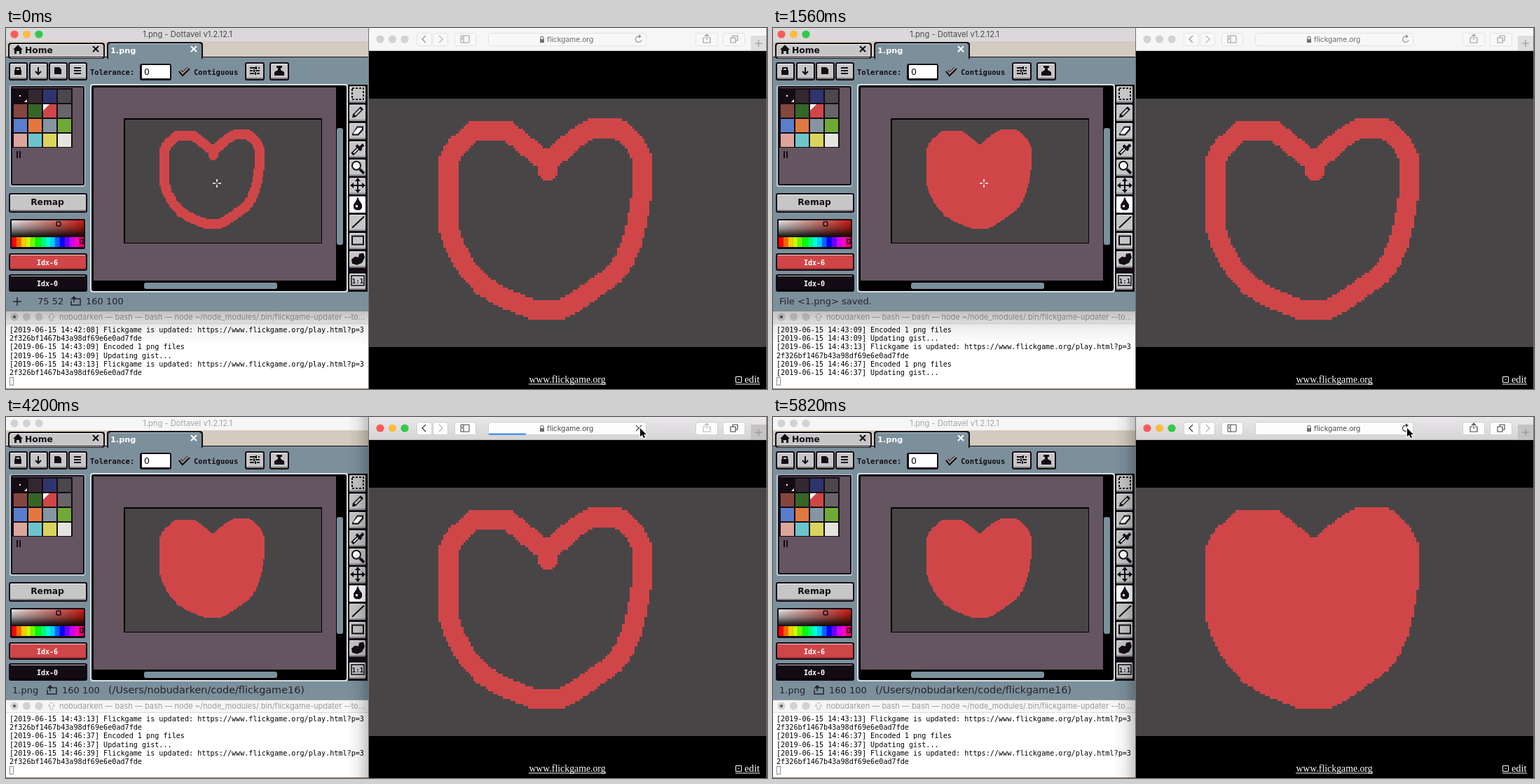
Write an HTML page with a canvas that moves like this. It is 1086x516 px and loops after 5.88 s.

```html
<!DOCTYPE html>
<html>
<head>
<meta charset="utf-8">
<style>
html, body { margin: 0; width: 100%; height: 100%; overflow: hidden; background: #000; }
canvas { display: block; }
</style>
</head>
<body>
<canvas width="1086" height="516"></canvas>
<script>
const LOOP = 5880;
const T = { fill: 360, hold: 600, save: 720, release: 1140, encode: 1260, publish: 2220,
            leave: 2640, overshoot: 3300, arrive: 3600, reload: 3840, blank: 4320, loaded: 4920 };
const UI = 'Inter, sans-serif', PIXEL = '"DejaVu Sans", sans-serif';
const MONO = '"DejaVu Sans Mono", monospace', SERIF = '"Liberation Serif", serif';
const SLATE = '#7c909c', PURPLE = '#655560', DARK = '#484547', RED = '#d04648', GRAY = '#c6c6c6', INK = '#140c14';
const g = document.querySelector('canvas').getContext('2d');

function rect(x, y, w, h, color) { g.fillStyle = color; g.fillRect(x, y, w, h); }

function round(x, y, w, h, r, color, border) {
  g.beginPath();
  g.roundRect(x, y, w, h, r);
  g.fillStyle = color;
  g.fill();
  if (border) { g.strokeStyle = border; g.lineWidth = 1; g.stroke(); }
}

function gradient(x0, y0, x1, y1, ...colors) {
  const grad = g.createLinearGradient(x0, y0, x1, y1);
  colors.forEach((c, i) => grad.addColorStop(i / (colors.length - 1), c));
  return grad;
}

function text(str, x, y, font, color, align = 'left') {
  g.font = font;
  g.fillStyle = color;
  g.textAlign = align;
  g.fillText(str, x, y);
}

// Draws an SVG path at x, y: filled when width is 0, stroked otherwise.
function shape(x, y, d, color, width = 0, dash = []) {
  const path = new Path2D(d);
  g.save();
  g.translate(x, y);
  g.fillStyle = g.strokeStyle = color;
  g.lineWidth = width;
  g.setLineDash(dash);
  width ? g.stroke(path) : g.fill(path);
  g.restore();
}

function dot(x, y, r, color) {
  g.fillStyle = color;
  g.beginPath();
  g.arc(x, y, r, 0, 7);
  g.fill();
}

function lights(x, y, step, colors) { colors.forEach((c, i) => dot(x + i * step, y, 5.6, c)); }
const LIVE = ['#fc5b57', '#fdbc40', '#34c84a'], IDLE = ['#d2d2d2', '#d2d2d2', '#d2d2d2'];

// 160 x 100 pixel sprite: a closed brush stroke, optionally flooded.
const HEART = new Path2D('M72 26V29V26L56 13H42.3L35 19.5 32 25V52L34.4 59.4 39.2 67.9 45.7 75.2 53.6 80 62 83.4 66 84.8H77.6' +
  'L83.8 81.4 91.7 75.8 98.8 70.7 102.7 65.4 105.5 59 107.8 50.4 109.8 39V23.5L107.5 18.5 100.5 12H89.5L82.5 16.3Z');

function makeSprite(flooded) {
  const c = document.createElement('canvas');
  c.width = 160;
  c.height = 100;
  const s = c.getContext('2d');
  s.fillStyle = DARK;
  s.fillRect(0, 0, 160, 100);
  s.fillStyle = RED;
  s.lineWidth = 8;
  s.lineJoin = 'round';
  for (let y = 0; y < 100; y++)
    for (let x = 0; x < 160; x++)
      if (s.isPointInStroke(HEART, x + .5, y + .5) || flooded && s.isPointInPath(HEART, x + .5, y + .5))
        s.fillRect(x, y, 1, 1);
  return c;
}
const outlined = makeSprite(false), flooded = makeSprite(true);

function button(x, y, w, h, face = GRAY, shade = '#7c7c7c') {
  round(x, y, w, h, 3, INK);
  round(x + 2, y + 2, w - 4, h - 4, 1, face);
  rect(x + 3, y + 2, w - 6, 1, 'rgba(255,255,255,.75)');
  rect(x + 2, y + h - 4, w - 4, 2, shade);
}

const TOOLS = [
  [['M-8-8H8V8H-8Z', INK, 2, [3, 2]]],
  [['M-8 8L-7 3 4-8 8-4-3 7Z', INK, 0], ['M-4 4L4-4', GRAY, 3]],
  [['M-8 5L-1-6H8V-1L1 7H-8Z', INK, 0], ['M-6 3L0-4H6V-2L0 5H-6Z', '#fff', 0]],
  [['M-8 8L2-2', INK, 5], ['M-6 6L1-1', '#fff', 2], ['M-2-5L5 2M2 0L8-6', INK, 4]],
  [['M-8-2a6 6 0 1 0 12 0a6 6 0 1 0-12 0', '#fff', 0], ['M-8-2a6 6 0 1 0 12 0a6 6 0 1 0-12 0', INK, 2], ['M3 3L9 9', INK, 4]],
  [['M-9 0H9M0-9V9', INK, 2], ['M0-11L4-6H-4ZM0 11L4 6H-4ZM-11 0L-6-4V4ZM11 0L6-4V4Z', INK, 0]],
  [['M0-10L2-5 6 1V6L3 9H-3L-6 6V1L-2-5Z', INK, 0], ['M-3 2H0V5H-3Z', '#fff', 0]],
  [['M-8 8L9-8', INK, 2]],
  [['M-8-6H8V6H-8Z', INK, 2]],
  [['M2-7L8-8 10-2 6 6-1 9-8 7-9 1-4-3 1-2Z', INK, 0]],
];
const PALETTE = ['#140c14', '#34282f', '#30346d', '#4b484b', '#854640', '#366528', RED, '#676568',
  '#5b7dcb', '#e27841', '#8595a1', '#70aa36', '#dca59b', '#6dc5cc', '#dad45e', '#e2e4de'];
const CHECK = 'M-7-1L-3 4 6-5';
const PAGE = 'M-5-3H6V6H-7V0M-3-6V2M-7-2L-3-6 0-3';

function drawTabs() {
  rect(0, 19, 517, 23, '#d3cbbf');
  round(3, 21, 138, 23, 4, INK);
  round(5, 23, 134, 20, 3, GRAY);
  rect(7, 23, 130, 1, '#fff');
  round(144, 20, 137, 25, 4, INK);
  round(146, 22, 133, 24, 3, SLATE);
  rect(149, 22, 127, 1, '#b9cad2');
  shape(17, 31, 'M0-7L7 0H5V6H2V2H-2V6H-5V0H-7Z', INK);
  text('Home', 27, 36, 'bold 12.3px ' + PIXEL, INK);
  text('1.png', 149, 36, 'bold 11.3px ' + PIXEL, '#fff');
  shape(128, 30, 'M-4-4L4 4M4-4L-4 4', INK, 2);
  shape(268, 30, 'M-4-4L4 4M4-4L-4 4', '#fff', 2);
  rect(0, 41, 145, 1, INK);
  rect(280, 41, 237, 1, INK);
}

function drawOptions(holding) {
  const label = 'bold 10.5px ' + MONO;
  [4, 33, 61, 89].forEach(x => button(x, 49, 27, 26));
  shape(17, 61, 'M-5-1H5V6H-5Z', INK);
  shape(17, 61, 'M-3 0V-4H3V0', INK, 2);
  shape(46, 61, 'M0-5V5M-4 1L0 5 4 1', INK, 2);
  shape(74, 61, 'M-5-5H2L5-2V5H-5Z', INK);
  shape(102, 61, 'M-5-4H5M-5 0H5M-5 4H5', INK, 2);
  const x = holding ? 131 : 255;
  shape(x, 62, CHECK, INK, 5);
  shape(x, 61, CHECK, holding ? '#d8d8d8' : '#a49a90', 2);
  if (holding) return text('Auto Select Layer', 145, 67, label, INK);
  text('Tolerance:', 120, 67, label, INK);
  round(191, 51, 45, 24, 3, INK);
  rect(194, 53, 40, 19, '#fff');
  text('0', 197, 67, '12.5px ' + PIXEL, INK);
  text('Contiguous', 268, 67, label, INK);
  button(341, 49, 28, 26);
  shape(355, 61, 'M-7-4H1M5-4H7M-7 0H-3M1 0H7M-7 4H-1M3 4H7M2-6V-2M-1-2V2M1 2V6', INK, 2);
  button(376, 49, 28, 26);
  shape(390, 61, 'M-4-7H4V-4H2V-1L7 2V7H-7V2L-2-1V-4H-4Z', INK);
}

function drawColors() {
  round(5, 82, 108, 145, 3, '#bccbd3');
  round(7, 83, 105, 142, 2, INK);
  rect(9, 85, 101, 138, PURPLE);
  rect(9, 86, 86, 85, INK);
  PALETTE.forEach((c, i) => rect(11 + i % 4 * 21, 88 + (i >> 2) * 21, 19, 19, c));
  shape(53, 109, 'M0 0H9L0 9Z', '#fff');
  shape(30, 106, 'M0 0V-4L-4 0Z', '#fff');
  rect(19, 96, 2, 2, '#fff');
  shape(18, 181, 'M-2-5V5M2-5V5', INK, 2);

  button(4, 236, 112, 28);
  text('Remap', 59, 253, 'bold 12.3px ' + PIXEL, INK, 'center');

  round(6, 273, 107, 43, 2, INK);
  rect(8, 275, 103, 23, gradient(8, 0, 110, 0, '#e8e8e8', '#cf8580', '#d01c14'));
  rect(8, 275, 103, 23, gradient(0, 275, 0, 298, 'rgba(0,0,0,0)', 'rgba(0,0,0,.35)', 'rgba(0,0,0,.9)'));
  for (let i = 0; i < 15; i++) rect(8 + i * 6.87, 299, 7, 14, `hsl(${i * 24},100%,50%)`);
  shape(75, 280, 'M-2-3H2L3-2V2L2 3H-2L-3 2V-2Z', INK, 1.5);
  shape(108, 305, 'M-2-3H2V3H-2Z', INK, 1.5);

  button(4, 322, 112, 25, RED, '#a23035');
  button(4, 352, 112, 25, INK, '#080508');
  text('Idx-6', 59, 339, 'bold 10px ' + MONO, '#fff', 'center');
  text('Idx-0', 59, 369, 'bold 10px ' + MONO, '#fff', 'center');
}

function drawSprite(t, holding) {
  round(120, 80, 368, 298, 4, '#d6e0e5');
  round(122, 82, 364, 294, 3, '#000');
  rect(125, 85, 346, 276, PURPLE);
  round(472, 143, 9, 167, 3, SLATE);
  round(197, 364, 190, 9, 3, SLATE);
  rect(168, 129, 283, 179, '#000');
  g.drawImage(t < T.fill ? outlined : flooded, 170, 131, 279.5, 175.5);
  if (holding) {
    g.strokeStyle = '#1432e4';
    g.lineWidth = 2.5;
    g.strokeRect(171, 132, 278, 173);
  }
}

function drawTools(holding) {
  rect(488, 81, 28, 296, INK);
  for (let i = 0; i < 11; i++) {
    const y = i < 10 ? 81.5 + i * 26.2 : 349;
    const active = i === (holding ? 5 : 6);
    button(488, y, 27, 27, active ? '#fff' : GRAY, active ? '#fff' : '#929292');
    (TOOLS[i] || []).forEach(part => shape(502, y + 12.5, ...part));
  }
  shape(502, 361, 'M-9-7H9V7H-9Z', INK, 1.5);
  text('1:1', 502, 365, 'bold 9px ' + MONO, INK, 'center');
}

function drawStatus(t, outside) {
  const ink = '#262329';
  const say = (str, x, size = 13) => text(str, x, 395, size + 'px ' + PIXEL, ink);
  if (outside) {
    say('1.png', 9);
    shape(66, 390, PAGE, ink, 1.5);
    say('160 100', 80);
    say('(/Users/nobudarken/code/flickgame16)', 146, 14.4);
  } else if (t >= T.save && t < T.leave) {
    say('File <1.png> saved.', 9);
  } else {
    shape(16, 391, 'M-6 0H6M0-6V6', ink, 1.5);
    say('75 52', 45);
    shape(100, 390, PAGE, ink, 1.5);
    say('160 100', 114);
  }
}

function drawEditor(t, pointer, active) {
  const holding = t >= T.hold && t < T.release;
  rect(0, 0, 517, 404, SLATE);
  rect(0, 0, 517, 19, active ? '#dad8da' : '#f6f6f6');
  lights(12, 9, 17.5, active ? LIVE : IDLE);
  text('1.png - Dottavel v1.2.12.1', 259, 13, '11.2px ' + UI, active ? '#4a4a4a' : '#a4a4a4', 'center');
  drawTabs();
  drawOptions(holding);
  drawColors();
  drawSprite(t, holding);
  drawTools(holding);
  drawStatus(t, pointer.x > 451);
}

const updated = time => [`[2019-06-15 ${time}] Flickgame is updated: https://www.flickgame.org/play.html?p=3`,
  '2f326bf1467b43a98df69e6e0ad7fde'];
const working = time => [`[2019-06-15 ${time}] Encoded 1 png files`, `[2019-06-15 ${time}] Updating gist...`];

function drawTerminal(t) {
  rect(0, 404, 517, 112, '#fff');
  rect(0, 404, 517, 1, '#a8a6a0');
  rect(0, 405, 517, 18, '#f6f6f6');
  rect(0, 422, 517, 1, '#dcdcdc');
  lights(12, 413, 17.5, IDLE);
  dot(12, 413, 2, '#555');
  shape(65, 413, 'M0-5L5 0H2V5H-2V0H-5Z', '#b8b8b8', 1);
  text('nobudarken — bash — bash — node ~/node_modules/.bin/flickgame-updater --to...', 76, 417, '11px ' + UI, '#9a9a9a');
  const log = [...updated('14:42:08'), ...working('14:43:09'), ...updated('14:43:13')];
  if (t >= T.encode) log.push(...working('14:46:37'));
  if (t >= T.publish) log.push(...updated('14:46:39'));
  log.slice(-6).forEach((line, i) => text(line, 5, 435 + i * 12.2, '10.15px ' + MONO, '#000'));
  g.strokeStyle = '#8c8c8c';
  g.lineWidth = 1;
  g.strokeRect(5.5, 499.5, 5, 11);
  rect(0, 515, 517, 1, '#9b8570');
}

// The focused window casts a soft shadow over its neighbours.
function drawShadow(browsing) {
  const soft = ['rgba(0,0,0,.22)', 'rgba(0,0,0,.06)', 'rgba(0,0,0,0)'];
  if (browsing) rect(487, 0, 30, 516, gradient(517, 0, 487, 0, ...soft));
  else rect(0, 404, 517, 50, gradient(0, 404, 0, 454, ...soft));
}

function drawToolbar(t, active) {
  const loading = t >= T.reload && t < T.loaded;
  const ink = active ? '#444' : '#9a9a9a', border = active ? '#cfcfcf' : '#e2e2e2';
  const face = active ? '#fdfdfd' : '#f8f8f8';
  rect(518, 0, 567, 32, active ? gradient(0, 0, 0, 32, '#e9e7e9', '#d6d4d6') : '#f6f6f6');
  rect(518, 32, 567, 1, '#b4b4b4');
  lights(534, 16, 17.5, active ? LIVE : IDLE);
  for (const [x, w] of [[586, 22], [609, 22], [640, 31], [688, 226], [984, 32], [1023, 32]])
    round(x + .5, 7.5, w - 1, 18, 3, face, border);
  shape(597, 16, 'M2-5L-3 0 2 5', ink, 1.4);
  shape(620, 16, 'M-2-5L3 0-2 5', '#b8b8b8', 1.4);
  shape(655, 16, 'M-6-5H6V5H-6ZM-2-5V5M-5-2H-3M-5 0H-3', ink, 1);
  shape(765, 17, 'M-3-1H3V4H-3Z', '#6e6e6e');
  shape(765, 17, 'M-2-1V-3A2 2 0 0 1 2-3V-1', '#6e6e6e', 1.2);
  text('flickgame.org', 772, 20, '10.3px ' + UI, active ? '#4c4c4c' : '#6c6c6c');
  if (loading) shape(903, 16, 'M-4-4L4 4M4-4L-4 4', '#555', 1.2);
  else {
    shape(903, 16, 'M4 1A4.3 4.3 0 1 1 1-4', ink, 1.2);
    shape(903, 16, 'M0-7L4-4 0-1Z', ink);
  }
  shape(1000, 15, 'M-2-1H-5V6H5V-1H2M0 2V-6M-3-3L0-6 3-3', loading && t < T.blank ? '#b8b8b8' : ink, 1.1);
  shape(1039, 16, 'M-5-2H2V5H-5ZM-2-2V-5H5V2H2', ink, 1.1);
  rect(1063, 11, 22, 21, active ? '#c4c2c4' : '#dedede');
  shape(1074, 22, 'M-5 0H5M0-5V5', '#8c8c8c', 1);

  if (t >= T.reload && t < T.loaded + 180) {
    const early = .1 + .135 * Math.min(1, (t - T.reload) / 360);
    const progress = t < T.blank ? early : t < T.loaded ? .9 : 1;
    g.globalAlpha = Math.min(1, (T.loaded + 180 - t) / 180);
    rect(689, 23.5, 225 * progress, 2, '#2a85e8');
    g.globalAlpha = 1;
  }
}

function drawPage(t) {
  rect(518, 33, 567, 483, '#000');
  if (t >= T.blank && t < T.loaded) {
    rect(518, 68, 283, 210, '#ff2600');
    rect(801, 68, 284, 210, '#00fb00');
    rect(518, 278, 283, 211, '#ff40ff');
    rect(801, 278, 284, 211, '#00fdff');
    rect(800.5, 68, 1, 421, 'rgba(0,0,0,.5)');
    return;
  }
  g.drawImage(t < T.loaded ? outlined : flooded, 518, 101, 567, 355);
  text('www.flickgame.org', 801, 507, '13.8px ' + SERIF, '#fff', 'center');
  rect(746, 508.5, 110, 1, '#fff');
  shape(1045.5, 502.5, 'M-4-4H4V4H-4ZM-1 0H1', '#fff', 1);
  text('edit', 1054, 507, '14.3px ' + SERIF, '#fff');
  rect(1041, 508.5, 35, 1, '#fff');
}

function pointerAt(t) {
  const stops = [[T.leave, 301, 222], [T.overshoot, 942, 27], [T.arrive, 905, 16]];
  const mix = ([t0, x0, y0], [t1, x1, y1]) => {
    const u = Math.max(0, Math.min(1, (t - t0) / (t1 - t0))), k = u * u * (3 - 2 * u);
    return { x: x0 + (x1 - x0) * k, y: y0 + (y1 - y0) * k };
  };
  return t < T.overshoot ? mix(stops[0], stops[1]) : mix(stops[1], stops[2]);
}

function drawPointer(t, { x, y }) {
  if (x < 470) {
    if (t >= T.hold && t < T.release) return;
    shape(x, y, 'M-6 0H-2M2 0H6M0-6V-2M0 2V6', '#fff', 1.6);
    rect(x - .5, y - .5, 1, 1, '#fff');
  } else {
    const arrow = 'M0 0V12L3 9.5 5 14 7 13 5 9H9Z';
    shape(x, y, arrow, '#fff', 2);
    shape(x, y, arrow, '#000');
  }
}

function draw(now) {
  const t = now % LOOP, pointer = pointerAt(t), browsing = t >= T.reload - 60;
  g.imageSmoothingEnabled = false;
  rect(0, 0, 1086, 516, '#77706a');
  drawEditor(t, pointer, !browsing);
  drawTerminal(t);
  drawShadow(browsing);
  drawToolbar(t, browsing);
  drawPage(t);
  drawPointer(t, pointer);
  requestAnimationFrame(draw);
}
requestAnimationFrame(draw);
</script>
</body>
</html>
```
